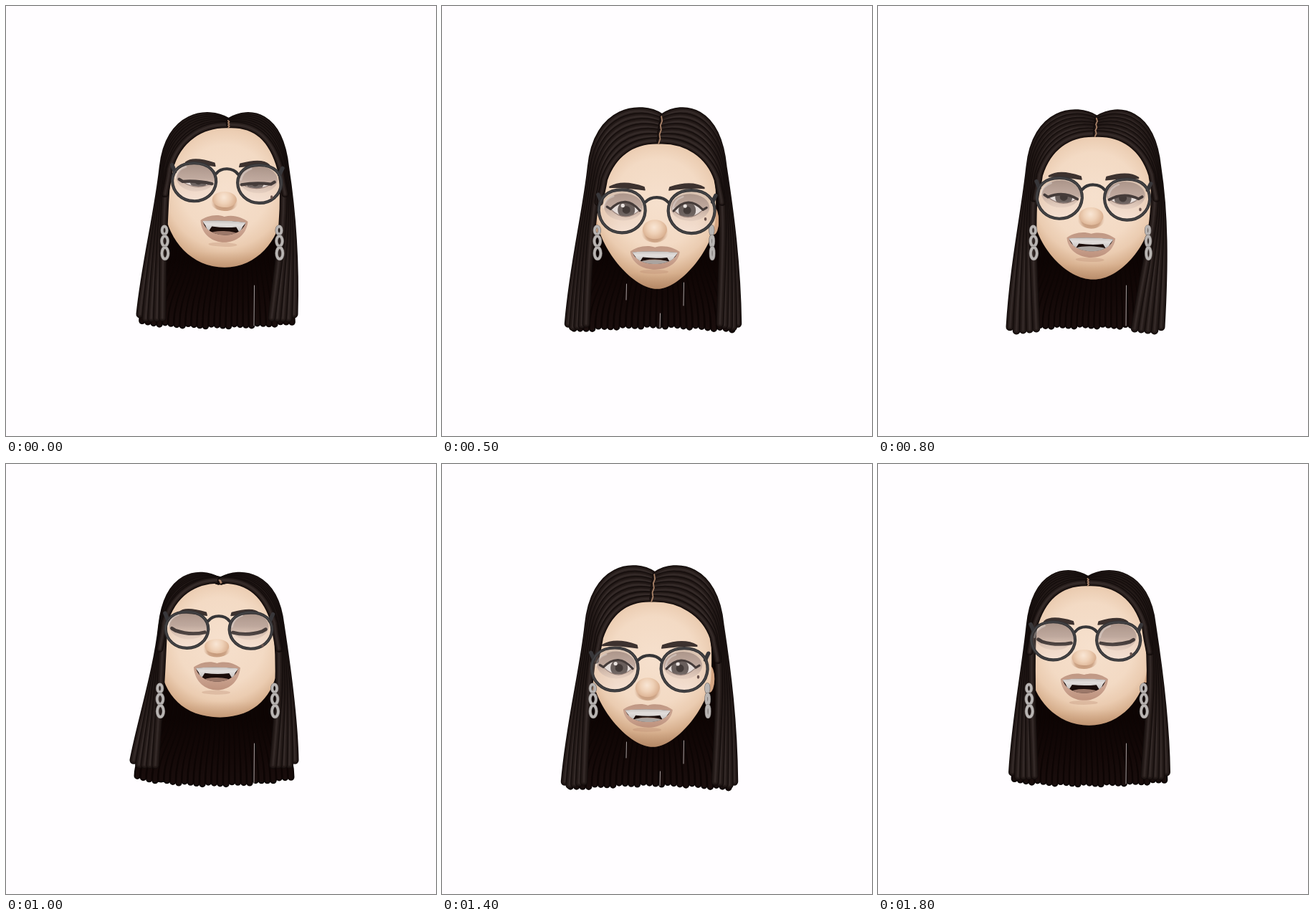
Recreate the animation shown at these times as an HTML page with a canvas. Size 600 by 600 pixels, loop 1.9 s.

```html
<!DOCTYPE html>
<html lang="en">
<head>
<meta charset="utf-8">
<title>Nodding laugh</title>
<style>
html, body { margin: 0; width: 100%; height: 100%; overflow: hidden; background: #fffdff; }
canvas { display: block; width: 100vw; height: 100vh; }
</style>
</head>
<body>
<canvas id="stage" width="600" height="600"></canvas>
<script>
const ctx = document.getElementById('stage').getContext('2d');
const LOOP = 1900, STEP = 100, NOD = 900;

// Slow sway under the nod: time, glasses x, roll, hair middle, eye lift
const SWAY = [
  [0, 307.5, .03, 294.5, .3],
  [300, 298.5, 0, 294.5, 0],
  [500, 299.5, .008, 294.5, 0],
  [800, 300, .02, 289.5, 0],
  [1200, 293.5, 0, 291.5, 0],
  [1400, 289.5, .006, 289.5, 0],
  [1800, 290, .004, 295, 0]
];

const lerp = (a, b, t) => a + (b - a) * t;
const lerpPt = (a, b, t) => [lerp(a[0], b[0], t), lerp(a[1], b[1], t)];
const clamp = (v, lo, hi) => Math.min(hi, Math.max(lo, v));
const wave = (time, peak) => Math.cos(2 * Math.PI * (time - peak) / NOD);

function poseAt(time) {
  let i = 0;
  while (i < SWAY.length - 2 && SWAY[i + 1][0] <= time) i++;
  const a = SWAY[i], b = SWAY[i + 1];
  const k = (time - a[0]) / (b[0] - a[0]);
  const [, gx, roll, mid, lift] = a.map((v, n) => lerp(v, b[n], k));
  const p = .4 - .8 * wave(time, 155); // 0 = head tipped back, 1 = head down
  const flare = wave(time, 350);       // hair swings out after the head
  const half = 119 + 8.5 * flare;
  const drift = gx - 299;
  const fx = 299 + .6 * drift;
  const partY = 156 - 6 * p;
  return {
    gx, roll, p, flare, fx, partY,
    gy: 246 + 41 * p,
    hairL: mid - half, hairR: mid + half,
    eye: clamp(p * 1.05 + lift, 0, 1), mouth: clamp(1 - .8 * p, .15, 1),
    outL: 212 + .4 * drift - 8 * p, outR: 390 + .4 * drift + 6 * p,
    inL: fx - 71 + 3 * p, inR: fx + 74 + 6 * p,
    partX: gx + 3 + 4.5 * p,
    lineX: gx + 3.5, lineY: Math.max(partY + 9, 170 + 23 * p),
    chin: 364 + 31 * p
  };
}

function path(start, ...curves) {
  ctx.beginPath();
  ctx.moveTo(...start);
  for (const c of curves) {
    if (c.length === 2) ctx.lineTo(...c);
    else if (c.length === 4) ctx.quadraticCurveTo(...c);
    else ctx.bezierCurveTo(...c);
  }
}
function fill(color) { ctx.fillStyle = color; ctx.fill(); }
function stroke(color, width) { ctx.strokeStyle = color; ctx.lineWidth = width; ctx.stroke(); }
function oval(x, y, rx, ry = rx) { ctx.beginPath(); ctx.ellipse(x, y, rx, ry, 0, 0, 7); }
function radial(x, y, r, stops) {
  const g = ctx.createRadialGradient(x, y, 0, x, y, r);
  stops.forEach(([at, color]) => g.addColorStop(at, color));
  return g;
}
function vertical(y0, y1, ...colors) {
  const g = ctx.createLinearGradient(0, y0, 0, y1);
  colors.forEach((c, i) => g.addColorStop(i / (colors.length - 1), c));
  return g;
}

function backHair(f) {
  const inset = 11 + 4 * f.flare, count = 27;
  const left = f.hairL + inset, right = f.hairR - inset;
  path([f.outL + 6, 225], [left - 4, 438 + 8 * f.p], [left + 30, 444], [right - 30, 444],
    [right + 4, 438 + 8 * f.p], [f.outR - 6, 225]);
  fill('#0e0504');
  const shade = vertical(355, 450, '#0d0403', '#130807', '#1a0e0d');
  for (let i = 0; i < count; i++) {
    const u = 2 * i / (count - 1) - 1;
    const x = lerp(left, right, i / (count - 1));
    const y = 444 + u * u * (11 * f.p - 5) + (i * 5 % 4) * .9;
    const top = f.fx + u * 78;
    path([top, 330], [top, 380, x, 400, x, y]);
    stroke('#0d0504', 9.5);
    stroke(shade, 5.5);
  }
  const slits = f.flare > 0
    ? [[257, 388, 410], [337, 386, 418], [304, 429, 449]]
    : [[346, 390, 446]];
  for (const [x, a, b] of slits) { path([x + .5, a], [x, b]); stroke('#b9b1b1', .9); }
}

function face(f) {
  const { fx, p, chin } = f, w = 83, cheek = 285 + 15 * p, top = f.lineY - 5;
  for (const s of [-1, 1]) {
    oval(fx + s * 80, 286 + 14 * p, 7, 19);
    fill('#d3a583');
  }
  path([fx, top], [fx + w - 4, top, fx + w + 3, 225, fx + w - 1, cheek],
    [fx + w - 6, cheek + 42, fx + 46 - 14 * p, chin, fx + 1, chin],
    [fx - 46 + 14 * p, chin, fx - w + 6, cheek + 42, fx - w, cheek],
    [fx - w - 3, 225, fx - w + 4, top, fx, top]);
  fill(radial(fx + 2, 254 + 20 * p, 122, [
    [0, '#f6e0cd'], [.5, '#f3dac4'], [.68, '#ebccb1'], [.84, '#d6ae8c'], [1, '#b88d6b']]));
  ctx.save();
  ctx.clip();
  ctx.fillStyle = vertical(chin - 22, chin, 'rgba(170,122,88,0)', 'rgba(170,122,88,.32)');
  ctx.fillRect(fx - w, chin - 22, 2 * w, 24);
  ctx.restore();
}

function nose(f) {
  const x = f.gx - 2.5, y = 270 + 43 * f.p, ry = 11 + 2.5 * f.p;
  oval(x, y + 3, 19, ry + 1);
  fill(radial(x, y + 3, 19, [[0, '#bd8d6c'], [.7, 'rgba(192,146,114,.75)'], [1, 'rgba(220,180,150,0)']]));
  oval(x, y - 1, 17, ry);
  fill(radial(x - 1, y - 4, 18, [[0, '#f9e6d5'], [.5, '#efd1b7'], [1, '#dab090']]));
}

function brow(f, s) {
  const y = 218 + 34 * f.p, thick = 3 + 1.5 * f.p;
  const at = dx => f.gx + s * dx;
  const out = 58 + 8 * f.p;
  path([at(out), y + 1], [at(48), y - 5 - thick, at(18), y + 1], [at(17), y + 5],
    [at(46), y + 1, at(out), y + 2]);
  fill('#3d322f');
  stroke('#3d322f', 1.6);
}

function eye(f, s) {
  const lens = f.gx + s * (45.5 + 3 * f.p);
  const x = lens - s * 5, y = f.gy, e = f.eye;
  const edge = y + lerp(1, -3, e);
  const upper = y + lerp(8, -24, e), lower = y + lerp(10, 17, e);
  oval(lens - s * 2, y - 6, 27, 19);
  fill(vertical(y - 26, y + 14, 'rgba(172,148,136,.9)', 'rgba(183,160,149,.9)', 'rgba(208,183,169,.35)'));
  if (e > .04) {
    ctx.save();
    path([x - 22, edge], [x, upper, x + 22, edge], [x, lower, x - 22, edge]);
    ctx.clip();
    fill('#e9e3e0');
    oval(x - s, y - 2, 12);
    fill('#514947');
    oval(x - s, y - 2, 5.5);
    fill('#211b1a');
    oval(x - 4, y - 8, 2.6);
    fill('#f4f0ee');
    ctx.restore();
    path([x - 20, edge + 1], [x, lower, x + 20, edge + 1]);
    stroke('rgba(80,58,52,.6)', 1.2);
  }
  path([x - s * 20, edge + 2], [x, upper, x + s * 21, edge], [x + s * 26, edge - 3]);
  stroke('#241d1c', lerp(4.8, 3.2, e));
}

function mouth(f) {
  const { p, mouth: m } = f;
  const x = f.gx - 2, y = 291 + 44 * p, w = 33 + 1.5 * p, h = 38 - 5 * p;
  const corner = y + 8, low = corner + (h - 8) * 1.33;
  path([x - w, corner], [x - w + 8, y + 2, x - 12, y - 2, x, y + 2],
    [x + 12, y - 2, x + w - 8, y + 2, x + w, corner],
    [x + w * .9, low, x - w * .9, low, x - w, corner]);
  fill(vertical(y, y + h, '#bf9783', '#cba491', '#bd917c'));
  oval(x - 1, y + h + 3, 20, 3);
  fill('rgba(170,122,95,.25)');

  ctx.save();
  const inner = corner + lerp(22, 26, m);
  path([x - w + 3, corner + 1], [x, y + 6, x + w - 3, corner + 1],
    [x + w * .75, inner, x - w * .75, inner, x - w + 3, corner + 1]);
  ctx.clip();
  fill('#1b0d0a');
  oval(x, y + lerp(23, 27, m), 20, 5);
  fill('#9c7869');
  if (m < .6) {
    oval(x, y + 24, 23, 4.5);
    fill('#aaa4a0');
  }
  path([x - w, corner - 2], [x, y + 5, x + w, corner - 2], [x + w - 7, y + 15],
    [x + 22, y + 24], [x + 17, y + 16], [x, y + 18, x - 17, y + 16],
    [x - 22, y + 24], [x - w + 7, y + 15]);
  fill(vertical(y + 5, y + 21, '#bdb8b5', '#e2dedc', '#c9c5c3'));
  ctx.restore();
}

// Strands sweep from the parting over the temple and hang down the side.
function sideHair(f, s) {
  const left = s < 0;
  const out = (left ? f.outL : f.outR) - s * 4, inn = (left ? f.inL : f.inR) + s * 5;
  const tip = (left ? f.hairL : f.hairR) - s * 5;
  const spread = 25 + Math.max(0, 415 - f.hairR) * .8;
  const { p } = f, count = 7, apex = 147 - 8 * p;
  const outer = [[f.partX + s * 2, f.partY + 5], [f.partX + s * 29, apex - 2],
    [out - s * 8, apex + 4], [out, 225]];
  const hairline = [[f.lineX + s, f.lineY - 5], [f.lineX + s * 38, f.lineY - 6],
    [inn - s * 12, f.lineY + 14], [inn, 227 + 15 * p]];
  for (let i = 0; i < count; i++) {
    const t = i / (count - 1);
    const [a, b, c, d] = outer.map((pt, n) => lerpPt(pt, hairline[n], t));
    const long = t < .75;
    let hang;
    if (long) {
      const k = t / .67;
      const x = tip - s * spread * k;
      const bend = out + s * (left ? 7 : 10) - s * 7 * k;
      const end = 421 + 28 * p - 11 * f.flare + (i * 3 % 4) * 1.5 + k * (1 - p) * 5;
      hang = [bend, 290, lerp(bend, x, .6) + s * 3 * (1 - k), 360, x, end];
    } else {
      hang = [d[0] + s * 2, 245 + 10 * p, d[0] + s * 5, 255 + 10 * p, d[0] + s * 6, 262 + 12 * p];
    }
    path(a, [...b, ...c, ...d], hang);
    const width = long ? 11 : 9.5;
    stroke('#130c0b', width);
    stroke('#211816', width - 2.5);
    ctx.save();
    ctx.translate(-1, -1.5);
    stroke('#2c2220', 4.5);
    stroke('#352b29', 1.8);
    ctx.restore();
  }
}

function parting(f) {
  const n = 6;
  ctx.beginPath();
  for (let i = 0; i <= n; i++) {
    const [x, y] = lerpPt([f.partX, f.partY + 4], [f.lineX, f.lineY - 1], i / n);
    ctx.lineTo(x + (i % 2 ? .8 : -.8), y);
  }
  stroke('#a98268', 1.8);
}

function earring(f, s) {
  const x = f.fx + (s < 0 ? -83 : 77);
  const thin = s > 0 ? 1 - .5 * clamp(f.p, 0, 1) : 1;
  [[313, 3.4, 5.5], [328, 4.2, 7], [345, 4.4, 8]].forEach(([y, rx, ry], i) => {
    oval(x + i * .4, y, rx * thin, ry);
    stroke('#6f6967', 4.6);
    stroke('#b9b5b3', 3.4);
  });
}

// Rounded lens, a little wider at the top than at the bottom.
function lensPath(x, y, rx, ry) {
  path([x, y - ry],
    [x + rx * .64, y - ry, x + rx, y - ry * .6, x + rx, y - 1],
    [x + rx * .97, y + ry * .57, x + rx * .54, y + ry, x, y + ry],
    [x - rx * .54, y + ry, x - rx * .97, y + ry * .57, x - rx, y - 1],
    [x - rx, y - ry * .6, x - rx * .64, y - ry, x, y - ry]);
}

function glasses(f) {
  const { gx, gy, p } = f;
  const sep = 45.5 + 3 * p, rx = 30.5 + 2 * p, ry = 26.5 + 3.5 * p;
  for (const s of [-1, 1]) {
    const x = gx + s * sep;
    lensPath(x, gy, rx, ry);
    fill(vertical(gy - ry, gy + ry, 'rgba(140,122,115,.3)', 'rgba(215,195,188,.18)', 'rgba(250,236,234,.42)'));
    path([x - 26, gy - 5], [x - 24, gy - 17, x - 12, gy - 21]);
    stroke('rgba(255,255,255,.3)', 2.5);
    path([x + s * (rx - 3), gy - 14], [x + s * (rx - 1), gy - 19, x + s * (rx + 1), gy - 23]);
    stroke('#38373a', 5.5);
    lensPath(x, gy, rx, ry);
    stroke('#363537', 4.2);
    stroke('#4a494b', 1.2);
  }
  const bx = 15 + p;
  path([gx - bx, gy - 13], [gx - 8, gy - 22, gx + 8, gy - 22, gx + bx, gy - 13]);
  stroke('#363537', 4.2);
  oval(gx + 63 + 5 * p, gy + 18 - 8 * p, 1.8, 2.4);
  fill('#6d5650');
}

function draw(time) {
  const f = poseAt(time);
  ctx.fillStyle = '#fffdff';
  ctx.fillRect(0, 0, 600, 600);
  ctx.lineCap = ctx.lineJoin = 'round';

  const rolled = paint => {
    ctx.save();
    ctx.translate(f.gx, f.gy + 20);
    ctx.rotate(f.roll);
    ctx.translate(-f.gx, -f.gy - 20);
    paint();
    ctx.restore();
  };
  const both = part => [-1, 1].forEach(s => part(f, s));

  backHair(f);
  face(f);
  rolled(() => {
    nose(f);
    both(eye);
    both(brow);
    mouth(f);
  });
  both(sideHair);
  parting(f);
  both(earring);
  rolled(() => glasses(f));
}

function tick(now) {
  draw(Math.floor(now % LOOP / STEP) * STEP);
  requestAnimationFrame(tick);
}
draw(0);
requestAnimationFrame(tick);
</script>
</body>
</html>
```
